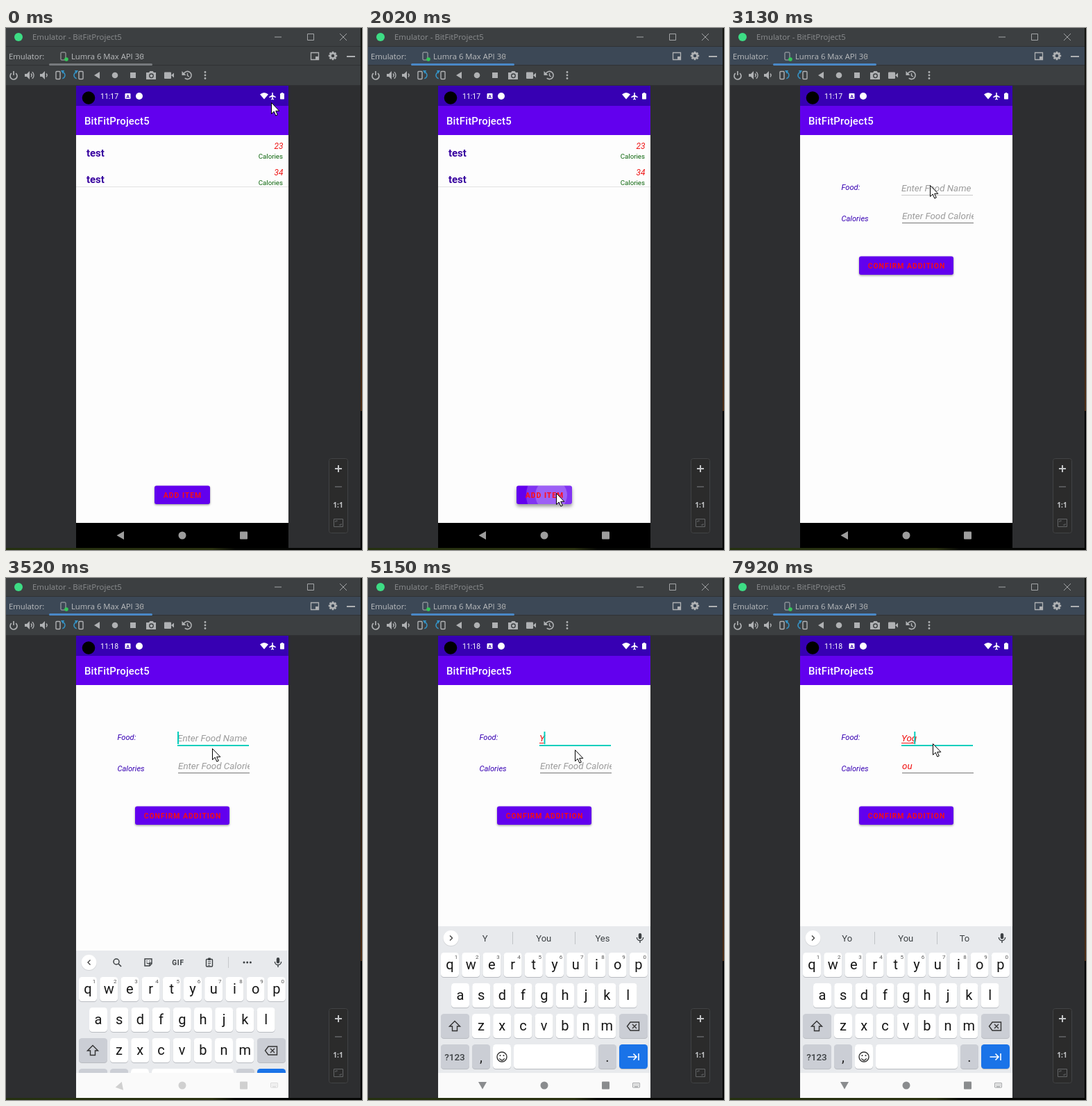
These frames come from a looping animation (513 by 751 pixels, 8000 ms). An HTML page with a canvas:

```html
<!DOCTYPE html>
<html lang="en">
<head>
<meta charset="utf-8">
<title>Emulator</title>
<style>
html, body { margin: 0; width: 100%; height: 100%; overflow: hidden; background: #2d2e30; }
canvas { display: block; width: 513px; height: 751px; }
</style>
</head>
<body>
<canvas id="stage" width="513" height="751"></canvas>
<script>
const g = document.getElementById('stage').getContext('2d');
const LOOP = 8000;
const UI = '"Open Sans", "Noto Sans", sans-serif';
const APP = 'Roboto, sans-serif';
const ICON = '#afb1b3', BLUE = '#3592c4', PURPLE = '#6200ee', DEEP = '#3700b3', TEAL = '#03cfbd', KEYINK = '#3c4043';

// Values hold until the next step: [time, ...values]
const mouseSteps = [
  [0, 382, 107], [120, 383, 106], [240, 385, 105], [520, 384, 102], [680, 377, 150], [840, 334, 390],
  [1000, 282, 620], [1160, 257, 716], [1320, 271, 663], [1590, 271, 669], [2160, 271, 672], [2290, 271, 675],
  [2700, 275, 580], [2830, 283, 360], [2980, 287, 240], [3130, 288, 226], [3390, 293, 236],
  [3520, 297, 245], [3640, 298, 247], [6430, 295, 242], [6580, 292, 238]
];
const nameSteps = [[0, ''], [5150, 'Y'], [7500, 'Yo'], [7920, 'Yog']];
const calSteps = [[0, ''], [5430, 'o'], [5570, 'ou']];
const hintSteps = [
  [0], [5150, 'Y', 'You', 'Yes'], [5430, 'o', 'of', 'on'], [5870, 'ou', 'our', 'out'],
  [6890, 'Y', 'You', 'Yes'], [7640, 'Yo', 'You', 'To']
];
const focusSteps = [[0, ''], [3260, 'name'], [5290, 'cal'], [6730, 'name']];
const caretSteps = [[0, false], [3390, true], [4350, false], [4780, true], [6280, false], [6730, true], [7190, false], [7500, true]];
const openSteps = [[2290, 0.955, 1.03, 0.8], [2410, 0.9947, 1.05, 1], [2560, 1, 1, 1]];
const riseSteps = [[3390, 150], [3520, 35], [3640, 0]];

const at = (steps, t) => steps.filter(s => s[0] <= t).pop().slice(1);

function rect(x, y, w, h, color, r = 0) {
  g.fillStyle = color;
  g.beginPath();
  g.roundRect(x, y, w, h, r);
  g.fill();
}
function box(x, y, w, h, color, r = 0, width = 1) {
  g.strokeStyle = color;
  g.lineWidth = width;
  g.beginPath();
  g.roundRect(x, y, w, h, r);
  g.stroke();
}
function disc(x, y, r, color) {
  g.fillStyle = color;
  g.beginPath();
  g.arc(x, y, r, 0, 7);
  g.fill();
}
function arc(x, y, r, from, to, color, width = 1.4) {
  g.strokeStyle = color;
  g.lineWidth = width;
  g.beginPath();
  g.arc(x, y, r, from, to);
  g.stroke();
}
function fill(d, color) {
  g.fillStyle = color;
  g.fill(new Path2D(d));
}
function line(d, color, width = 1.4) {
  g.strokeStyle = color;
  g.lineWidth = width;
  g.stroke(new Path2D(d));
}
function text(s, x, y, font, color, align = 'left', spacing = 0) {
  g.font = font;
  g.fillStyle = color;
  g.textAlign = align;
  g.letterSpacing = spacing + 'px';
  g.fillText(s, x, y);
}
function clipped(x, y, w, h, draw) {
  g.save();
  g.beginPath();
  g.rect(x, y, w, h);
  g.clip();
  draw();
  g.restore();
}
function scaled(k, alpha, draw) {
  g.save();
  g.globalAlpha = alpha;
  g.translate(254, 415.5);
  g.scale(k, k);
  g.translate(-254, -415.5);
  draw();
  g.restore();
}

function speaker(x, waves) {
  fill(`M${x - 6} 66h3l4 -4v12l-4 -4h-3z`, ICON);
  for (let i = 0; i < waves; i++) arc(x + 1, 68, 3 + i * 3, -0.9, 0.9, ICON);
}
function rotatePhone(x, side) {
  box(x - side * 3 - 3, 62.5, 6, 11, ICON, 1, 1.4);
  arc(x + side * 2, 68, 5, side > 0 ? -1.3 : 1.84, side > 0 ? 1.3 : 4.44, BLUE, 1.6);
  fill(`M${x + side} 61l${side * 5} 0l${-side * 2} 5z`, BLUE);
}
function gear(x, y) {
  for (let i = 0; i < 8; i++) {
    const a = i * Math.PI / 4, c = Math.cos(a), s = Math.sin(a);
    line(`M${x + 3 * c} ${y + 3 * s}L${x + 6.2 * c} ${y + 6.2 * s}`, ICON, 2.6);
  }
  arc(x, y, 3.6, 0, 7, ICON, 2.6);
}

function desktop(active) {
  rect(0, 0, 513, 751, '#2d2e30');
  rect(0, 0, 511, 83, '#3c3f41');
  if (active) rect(0, 27, 511, 26, '#3c4856');
  rect(0, 26, 511, 1, '#303234');
  rect(0, 53, 511, 1, '#303234');
  rect(0, 82, 511, 1, '#303234');

  disc(18, 13, 6, '#3ddc84');
  text('Emulator - BitFitProject5', 38, 17, '11.4px ' + UI, '#8b8d8f');
  line('M387 13h10M481 8l10 10M491 8l-10 10', '#a3a5a7', 1);
  box(434.5, 8.5, 9, 9, '#a3a5a7');

  text('Emulator:', 4, 45, '11.3px ' + UI, '#bbbdbf');
  text('Lumra 6 Max API 30', 94, 45, '11.3px ' + UI, '#bbbdbf');
  box(79, 35, 7, 11, ICON, 1);
  disc(87, 45, 2.8, '#35c759');
  line('M193 38l6 6M199 38l-6 6', '#777a7c', 1);
  rect(62, 51, 149, 3, active ? '#4a88c7' : '#777a7d', 1.5);
  box(439.5, 35.5, 11, 10, ICON, 0, 1.3);
  rect(446, 41, 5, 5, ICON);
  gear(471, 40);
  rect(491, 40, 12, 2, ICON);

  arc(11, 69, 5, -0.9, 4.04, ICON, 1.7);
  line('M11 62v6', ICON, 1.7);
  speaker(33, 2);
  speaker(55, 1);
  rotatePhone(78, 1);
  rotatePhone(105, -1);
  fill('M127 68l8 -5v10z', ICON);
  disc(157, 68, 4.3, ICON);
  rect(179, 64, 8, 8, ICON);
  fill('M202 64h4l1.5 -2h4l1.500 2h3v10h-14z', ICON);
  arc(209.500, 68.800, 2.8, 0, 7, '#3c3f41', 1.3);
  rect(228, 63.500, 10, 9.500, ICON, 1);
  fill('M238 68l4 -3.500v7z', ICON);
  arc(261.500, 68, 5.6, -2.7, 2.3, ICON, 1.6);
  fill('M253.500 62v6h6z', ICON);
  line('M261.500 65v3.500l2.500 1.500', ICON);
  for (let y = 63.5; y < 74; y += 4.5) disc(287, y, 1.4, ICON);

  rect(465, 619, 28, 108, '#2b2b2b', 3);
  box(465.5, 619.5, 27, 107, '#414345', 3);
  line('M474 634h10M479 629v10', '#c3c5c7', 2);
  line('M474 660h10', '#636567', 1.5);
  text('1:1', 478.5, 690, 'bold 10px ' + UI, '#c3c5c7', 'center');
  box(472.5, 706.5, 13, 11, '#636567');
  line('M475 711v-2h3M480 715h3v-2', '#636567', 1);

  const side = g.createLinearGradient(0, 0, 0, 551);
  side.addColorStop(0, '#11120e');
  side.addColorStop(0.55, '#24180e');
  side.addColorStop(1, '#4b2b12');
  rect(511, 0, 2, 751, '#000');
  rect(511, 0, 2, 551, side);
  const foot = g.createLinearGradient(0, 0, 330, 0);
  foot.addColorStop(0, '#24300f');
  foot.addColorStop(0.9, '#29300f');
  foot.addColorStop(1, '#050604');
  rect(0, 748, 513, 3, '#050604');
  rect(0, 748, 330, 3, foot);
}

function frame() {
  rect(101, 83, 306, 665, '#fdfdfd');
  rect(101, 83, 306, 29, DEEP);
  rect(101, 112, 306, 42, PURPLE);
  rect(101, 712, 306, 36, '#000');
  text('BitFitProject5', 113, 138.5, '500 14.9px ' + APP, '#fff', 'left', 0.2);
}
function button(label, x, y, w, lift = 0) {
  g.save();
  g.shadowColor = 'rgba(0,0,0,.4)';
  g.shadowBlur = 3 + lift;
  g.shadowOffsetY = 1.3 + lift;
  rect(x, y, w, 26.5, PURPLE, 3);
  g.restore();
  text(label, x + w / 2 + 0.5, y + 17.3, 'bold 10.4px ' + APP, '#f40c18', 'center', 1);
}
function home(t) {
  frame();
  [[23, 0], [34, 37.5]].forEach(([n, dy]) => {
    text('test', 116, 185 + dy, 'bold 14.9px ' + APP, '#37009f');
    text(n, 399.5, 174 + dy, 'italic 11.9px ' + APP, '#ee1414', 'right');
    text('Calories', 399, 188 + dy, '9.7px ' + APP, '#0a640a', 'right');
  });
  rect(101, 228, 306, 1, '#e2e2e2');
  const pressed = t >= 2020;
  button('ADD ITEM', 214, 658.5, 80, pressed ? 2 : 0);
  if (pressed) {
    const grow = t < 2160 ? 0 : 25;
    clipped(214, 658.5, 80, 26.5, () => {
      disc(270, 672, 42 + grow, 'rgba(255,255,255,.2)');
      disc(264, 672, 23 + grow, 'rgba(255,255,255,.22)');
    });
    text('ADD ITEM', 254.5, 675.8, 'bold 10.4px ' + APP, '#f40c28', 'center', 1);
  }
}

function field(x, base, value, hint, idle, focused, caret, composing) {
  const font = 'italic 13.4px ' + APP;
  clipped(x, base - 18, 103, 30, () => text(value || hint, x, base, font, value ? '#f01010' : '#9b9b9b'));
  const w = value ? g.measureText(value).width : 0;
  if (focused) rect(x, base + 5, 103, 2, TEAL);
  else rect(x, base + 5, 103, 1, idle);
  if (composing && value) rect(x, base + 2, w, 1, '#f01010');
  if (focused && caret) rect(x + w, base - 14, 2, 18, TEAL);
}
function form(t) {
  frame();
  const [focus] = at(focusSteps, t), [caret] = at(caretSteps, t);
  text('Food:', 160.5, 233, 'italic 11.1px ' + APP, DEEP);
  text('Calories', 160.5, 278, 'italic 11.1px ' + APP, DEEP);
  field(247, 235, at(nameSteps, t)[0], 'Enter Food Name', '#c9c9c9', focus === 'name', caret, t < 5290 || t >= 6890);
  field(248, 275, at(calSteps, t)[0], 'Enter Food Calories', '#777', focus === 'cal', caret, t >= 5870 && t < 6730);
  button('CONFIRM ADDITION', 186, 328.5, 136);
}

function key(x, y, w, color = '#fff') {
  rect(x, y + 1, w, 35, '#b9bcc1', 4.5);
  rect(x, y, w, 35, color, 4.5);
}
function letters(row, x, y) {
  [...row].forEach((ch, i) => {
    const cx = x + i * 30.2;
    key(cx - 13, y, 26);
    text(ch, cx, y + 24, '20px ' + APP, '#161616', 'center');
  });
}
function toolRow() {
  line('M121.500 514.500l-3.500 3.500l3.500 3.500', '#444', 1.4);
  arc(159, 517, 4, 0, 7, KEYINK, 1.5);
  line('M162 520l4 4', KEYINK, 1.7);
  line('M200 513h10v7l-3 3h-7zM210 519h-3v4', KEYINK, 1.4);
  arc(205, 517.5, 2.3, 0.2, 2.9, KEYINK, 1.2);
  disc(203, 516, 0.8, KEYINK);
  disc(207, 516, 0.8, KEYINK);
  text('GIF', 248, 521.5, 'bold 10px ' + APP, KEYINK, 'center', 0.8);
  box(288.500, 513.500, 9, 10.500, KEYINK, 1, 1.4);
  rect(291, 511.500, 4, 3.500, KEYINK, 1);
  line('M291 517h4M291 519.500h4M291 522h3', KEYINK, 1);
  rect(320, 510, 1, 16, '#c6c8cc');
  for (const x of [343, 347.7, 352.4]) disc(x, 518, 1.5, KEYINK);
}
function keyboard(t) {
  rect(101, 501, 306, 211, '#e8eaed');
  rect(101, 712, 306, 80, '#fafafa');
  disc(119.5, 518.7, 11.3, '#d3d5d8');
  disc(119.5, 518, 11, '#fff');
  const words = at(hintSteps, t);
  if (words.length) {
    line('M118 514.500l3.500 3.500l-3.500 3.500', '#444', 1.4);
    words.forEach((w, i) => text(w, 168.7 + i * 84.6, 523, '13px ' + APP, KEYINK, 'center'));
    rect(208, 509, 1, 18, '#c0c3c7');
    rect(298, 509, 1, 18, '#c0c3c7');
  } else toolRow();
  rect(389.8, 511, 4.4, 8.5, KEYINK, 2.2);
  arc(392, 517, 4.6, 0, Math.PI, KEYINK, 1.4);
  line('M392 521.500v3.500', KEYINK, 1.4);

  letters('qwertyuiop', 118, 539);
  [...'1234567890'].forEach((n, i) => text(n, 127 + i * 30.2, 548, '8px ' + APP, '#555', 'center'));
  letters('asdfghjkl', 133, 583);
  letters('zxcvbnm', 163, 627);
  for (const [x, y, w, c] of [
    [105, 627, 41], [362, 627, 41], [105, 671, 41], [150, 671, 26],
    [180, 671, 26, '#fff'], [210, 671, 118, '#fff'], [332, 671, 26], [362, 671, 41, '#1a73e8']
  ]) key(x, y, w, c || '#cbced5');
  line('M125 637.500l-7.500 7.500h4v6.500h7v-6.500h4z', '#333');
  line('M373.500 645l4.500 -6h12.500v12h-12.500zM381 642l6 6M387 642l-6 6', '#333');
  text('?123', 125, 694, '500 13.5px ' + APP, KEYINK, 'center');
  text(',', 163, 696, '20px ' + APP, '#222', 'center');
  text('.', 345, 696, '20px ' + APP, '#222', 'center');
  arc(193, 689, 7, 0, 7, '#333', 1.4);
  arc(193, 690, 3.7, 0.3, 2.84, '#333', 1.4);
  disc(190.5, 687, 1.1, '#333');
  disc(195.5, 687, 1.1, '#333');
  line('M374.500 689h12M382.500 684.500l4.500 4.500l-4.500 4.500M390 684v10', '#fff', 1.6);
}

function statusBar(t) {
  disc(119, 100.5, 9.3, '#000');
  text(t < 3390 ? '11:17' : '11:18', 136, 102, '10.5px ' + APP, '#fff');
  rect(171.5, 94, 8, 8, '#fff', 1);
  text('A', 175.5, 100.8, 'bold 7px ' + APP, DEEP, 'center');
  disc(192, 98, 5, '#fff');
  fill('M366 95.500Q372 90.500 378 95.500L372 102.500z', '#fff');
  fill('M383.200 93.500q.8 -1.500 1.600 0v3l4 2.500v1.200l-4 -1.200v2.500l1.200 1v.9l-2 -.6l-2 .6v-.9l1.200 -1v-2.500l-4 1.200v-1.200l4 -2.500z', '#fff');
  rect(395, 94, 6, 8.5, '#fff', 0.8);
  rect(396.7, 93, 2.6, 2, '#fff');
}
function navBar(t) {
  const typing = t >= 3390, turning = typing && t < 3790;
  const ink = turning ? '#d0d0d0' : typing ? '#8a8c8e' : '#9d9d9d';
  g.save();
  g.translate(165, 730);
  // Back arrow turns down while the keyboard is open
  g.rotate(!typing ? 0 : t < 3520 ? -1.9 + Math.PI : turning ? 1.9 : -Math.PI / 2);
  fill('M-5.500 0L5 -6V6z', ink);
  g.restore();
  disc(254, 730, 5.5, ink);
  rect(337, 724.5, 11, 11, ink, 1);
  if (typing) {
    box(381.5, 726.5, 10, 6.5, ink, 0.5, 0.8);
    for (let i = 0; i < 8; i++) rect(383 + i % 4 * 2, 728 + (i >> 2) * 2, 1, 1, ink);
    rect(384, 731.5, 5, 1, ink);
  }
}
function mouse(x, y) {
  const arrow = `M${x + .5} ${y + .5}v16l3.700 -3.400l2.600 6l2.500 -1.100l-2.600 -5.700h5.100z`;
  fill(arrow, '#fff');
  line(arrow, '#000', 1);
}

function phone(t) {
  if (t < 2290) home(t);
  else {
    const [inner, outer, alpha] = at(openSteps, t);
    if (inner < 1) scaled(outer, 1, () => home(t));
    scaled(inner, alpha, () => form(t));
  }
  if (t >= 3390) {
    const [drop] = at(riseSteps, t);
    rect(101, 712, 306, 36, '#fafafa');
    g.save();
    g.translate(0, drop);
    keyboard(t);
    g.restore();
    rect(101, 712, 306, 36, '#fafafa');
  }
  statusBar(t);
  navBar(t);
}

function draw(now) {
  const t = now % LOOP;
  desktop(t >= 2020);
  clipped(101, 83, 306, 665, () => phone(t));
  mouse(...at(mouseSteps, t));
}

const start = performance.now();
function tick() {
  draw(performance.now() - start);
  requestAnimationFrame(tick);
}
tick();
</script>
</body>
</html>
```
